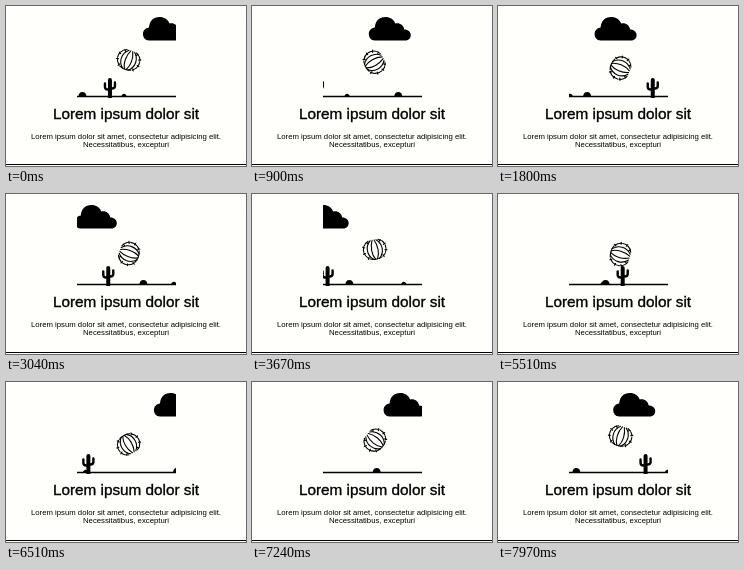
Animation, 240 px wide and 160 px high, one loop 8 s. Source, as an HTML page:

```html
<!DOCTYPE html>
<html lang="en">
<head>
<meta charset="utf-8">
<title>Desert</title>
<style>
  html, body { margin: 0; width: 100%; height: 100%; overflow: hidden; background: #fffffb; }
  svg { display: block; width: 100vw; height: 100vh; }
  text { font-family: "Liberation Sans", Arial, sans-serif; text-anchor: middle; fill: #000; }
  .title { font-size: 15.3px; stroke: #000; stroke-width: .35px; }
  .body { font-size: 7.74px; }
  .line { fill: none; stroke: #000; stroke-linecap: round; stroke-linejoin: round; }
</style>
</head>
<body>
<svg viewBox="0 0 240 160">
  <defs>
    <clipPath id="window"><rect x="71" y="0" width="99" height="92"/></clipPath>
  </defs>
  <g clip-path="url(#window)">
    <path id="cloud" d="M6 34.5C2 34.5 0 31.5 0 28C0 24.5 2.5 22 6 21.5C6.500 15 10.500 11 16.500 11C21.500 11 25 13.500 26.500 17.500C31 16.500 35 19.500 35.500 23.500C39.500 23.500 42 26 42 29C42 32 40 34.5 36.500 34.5Z"/>
    <path id="rock" d="M-4 91C-4 87.500 -2.500 86 0 86C2.500 86 4 87.500 4 91Z"/>
    <path id="pebble" d="M-2.700 91C-2.700 89 -1.500 87.700 0 87.700C1.500 87.700 2.700 89 2.700 91Z"/>
    <g id="cactus" class="line">
      <path stroke-width="4" d="M0 91V74"/>
      <path stroke-width="2.400" d="M-5 77.500V81Q-5 83.500 -2 83.500H0M5 76.500V80Q5 82.500 2 82.500H0"/>
    </g>
    <path class="line" stroke-width="1.300" d="M70 90.500H171"/>
    <g id="weed" class="line" stroke-width="1.100">
      <path stroke-dasharray="7 1.500 4 1" d="M-5 -9C-13 -6 -13.500 5 -6 9Q0 11.500 6 9C13.500 5 13 -6 5 -9"/>
      <path d="M-3 -9C-9 -4 -9 5 -3 10M3 -9C9 -4 9 5 3 10M-1 -9C-4 -3 -4 5 -1 10M1 -9C4 -3 4 5 1 10"/>
      <path d="M-7 -8L-5.500 -6.500M7 -8L5.500 -6.500M-11.500 -4L-9.500 -3M11.500 -4L9.500 -3M-12 3L-10 2.500M12 3L10 2.500M-8 9L-7 7M8 9L7 7"/>
    </g>
  </g>
  <text class="title" x="120" y="113">Lorem ipsum dolor sit</text>
  <text class="body" x="120" y="133">Lorem ipsum dolor sit amet, consectetur adipisicing elit.</text>
  <text class="body" x="120" y="141.300">Necessitatibus, excepturi</text>
  <rect y="158" width="240" height="1"/>
</svg>
<script>
  const LOOP = 8, ROLL = 4;
  const mod = (a, n) => ((a % n) + n) % n;
  const byId = id => document.getElementById(id);

  // Each item drifts left over its distance, then re-enters from the right.
  const drifters = [
    { el: byId("cloud"), start: 137, end: 14, distance: 157, period: 7 },
    { el: byId("cactus"), start: 104, end: 50, distance: 127, period: 3 },
    { el: byId("rock"), start: 76.5, end: 50, distance: 127, period: 2 },
    { el: byId("pebble"), start: 118, end: 50, distance: 127, period: 5 }
  ];
  const weed = byId("weed");
  const turns = [[0, 20], [.1, 24], [.38, 107], [.45, 113], [.63, 150], [.76, 290], [1, 380]];

  function angleAt(phase) {
    const i = turns.findIndex(([p]) => p > phase);
    const [p0, a0] = turns[i - 1], [p1, a1] = turns[i];
    return a0 + (a1 - a0) * (phase - p0) / (p1 - p0);
  }

  function draw(now) {
    const t = (now / 1000) % LOOP;
    for (const { el, start, end, distance, period } of drifters) {
      const x = end + mod(start - end - distance * t / period, distance);
      el.setAttribute("transform", `translate(${x} 0)`);
    }
    const phase = (t % ROLL) / ROLL;
    const y = 58.3 - 4.8 * Math.cos(2 * Math.PI * (phase - .05));
    weed.setAttribute("transform", `translate(122.7 ${y}) rotate(${angleAt(phase)})`);
    requestAnimationFrame(draw);
  }
  draw(performance.now());
</script>
</body>
</html>
```
